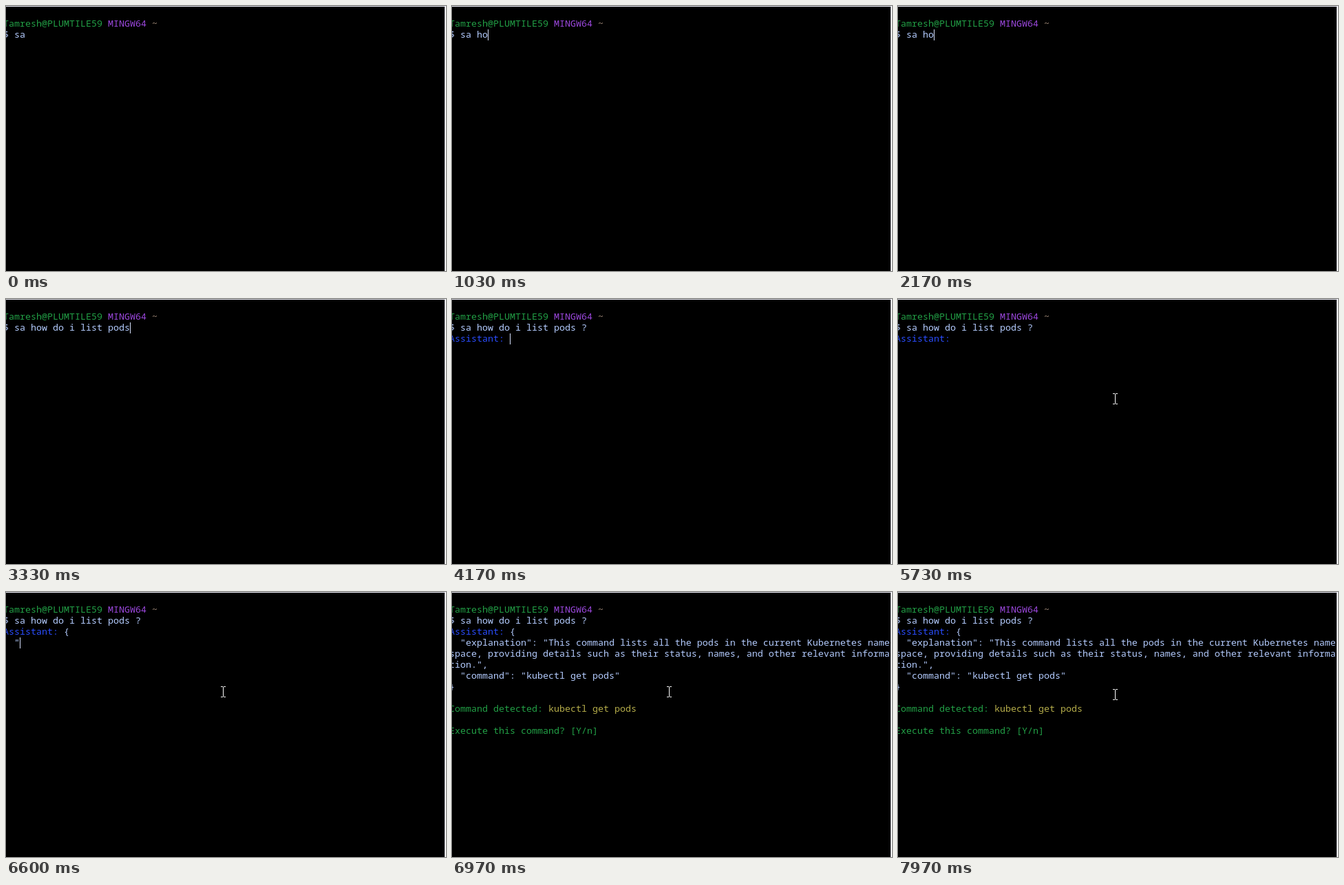
An HTML page that plays this animation: 639 px wide and 385 px high, repeating every 8000 ms.

```html
<!DOCTYPE html>
<html lang="en">
<head>
<meta charset="utf-8">
<title>Terminal session</title>
<style>
  html, body { margin: 0; width: 100%; height: 100%; overflow: hidden; background: #000; }
  #stage { position: relative; width: 639px; height: 385px; overflow: hidden; background: #000; }
  #text {
    position: absolute; left: -4px; top: 17px; margin: 0; white-space: pre;
    font: 13.333px/16px "Noto Sans Mono", "DejaVu Sans Mono", monospace;
    font-variant-ligatures: none;
  }
  #caret { position: absolute; width: 1px; height: 16px; background: #d8e2ff; }
  #pointer { position: absolute; left: 312px; top: 137px; }
  .edge { position: absolute; top: 0; right: 0; background: #f0f0fa; }
</style>
</head>
<body>
<div id="stage">
  <pre id="text"></pre>
  <div id="caret"></div>
  <svg id="pointer" width="7" height="16" shape-rendering="crispEdges" fill="#fff">
    <path d="M0 0h3v1h1v-1h3v1h-3v14h3v1h-3v-1h-1v1h-3v-1h3v-14h-3z"/>
  </svg>
  <div class="edge" style="width:639px;height:1px"></div>
  <div class="edge" style="width:2px;height:385px"></div>
</div>
<script>
const LOOP = 8000, CELL = 8, ROW = 16, BLINK = 500;
const GREEN = '#22a046', PURPLE = '#9c48de', TAN = '#ad9480',
      PALE = '#b4ccff', BLUE = '#2a4dff', YELLOW = '#b5ad4a';

const tokens = [
  [GREEN, 'Tamresh@PLUMTILE59 '],
  [PURPLE, 'MINGW64 '],
  [TAN, '~\n'],
  [PALE, '$ sa how do i list pods ?\n'],
  [BLUE, 'Assistant: '],
  [PALE, '{\n  "explanation": "This command lists all the pods in the current Kubernetes name\n' +
         'space, providing details such as their status, names, and other relevant informa\n' +
         'tion.",\n  "command": "kubectl get pods"\n}\n\n'],
  [GREEN, 'Command detected: '],
  [YELLOW, 'kubectl get pods\n\n'],
  [GREEN, 'Execute this command? [Y/n] ']
];
const full = tokens.map(token => token[1]).join('');
const after = part => full.indexOf(part) + part.length;

// Each step: time, number of characters shown from then on
const steps = [
  [-700, after('$ sa')],
  [700, after('$ sa ')],
  [890, after('$ sa h')],
  [980, after('$ sa ho')]
];
const typeOut = (from, to, start, gap) => {
  for (let n = from + 1; n <= to; n++) steps.push([start + (n - from - 1) * gap, n]);
};
typeOut(after('$ sa ho'), after('list pods'), 2530, 50);
typeOut(after('list pods'), after('pods ?'), 3530, 170);
steps.push(
  [4100, after('Assistant: ')],
  [6530, after('Assistant: {')],
  [6570, after('{\n  "')],
  [6630, after('Kubernetes name\n')],
  [6665, after('tion.",')],
  [6700, after('"kubectl get pods"\n}')],
  [6770, full.length]
);

const [text, caret, pointer] = ['text', 'caret', 'pointer'].map(id => document.getElementById(id));
const spans = tokens.map(([color]) => {
  const span = document.createElement('span');
  span.style.color = color;
  return text.appendChild(span);
});

function draw(t) {
  const [time, count] = steps.filter(step => step[0] <= t).pop();
  let left = count;
  tokens.forEach(([, part], i) => {
    const shown = part.slice(0, Math.max(0, left));
    if (spans[i].textContent !== shown) spans[i].textContent = shown;
    left -= part.length;
  });

  const lines = full.slice(0, count).split('\n');
  const lit = (t - time) % (2 * BLINK) < BLINK && count < full.length;
  caret.style.visibility = lit ? 'visible' : 'hidden';
  caret.style.left = lines.at(-1).length * CELL - 4 + 'px';
  caret.style.top = 18 + (lines.length - 1) * ROW + 'px';

  pointer.style.visibility = t >= 4500 ? 'visible' : 'hidden';
  const drop = Math.round(4 * Math.min(1, Math.max(0, (t - 7650) / 150)));
  pointer.style.top = 137 + drop + 'px';
}

const start = performance.now();
function tick() {
  draw((performance.now() - start) % LOOP);
  requestAnimationFrame(tick);
}
tick();
</script>
</body>
</html>
```
